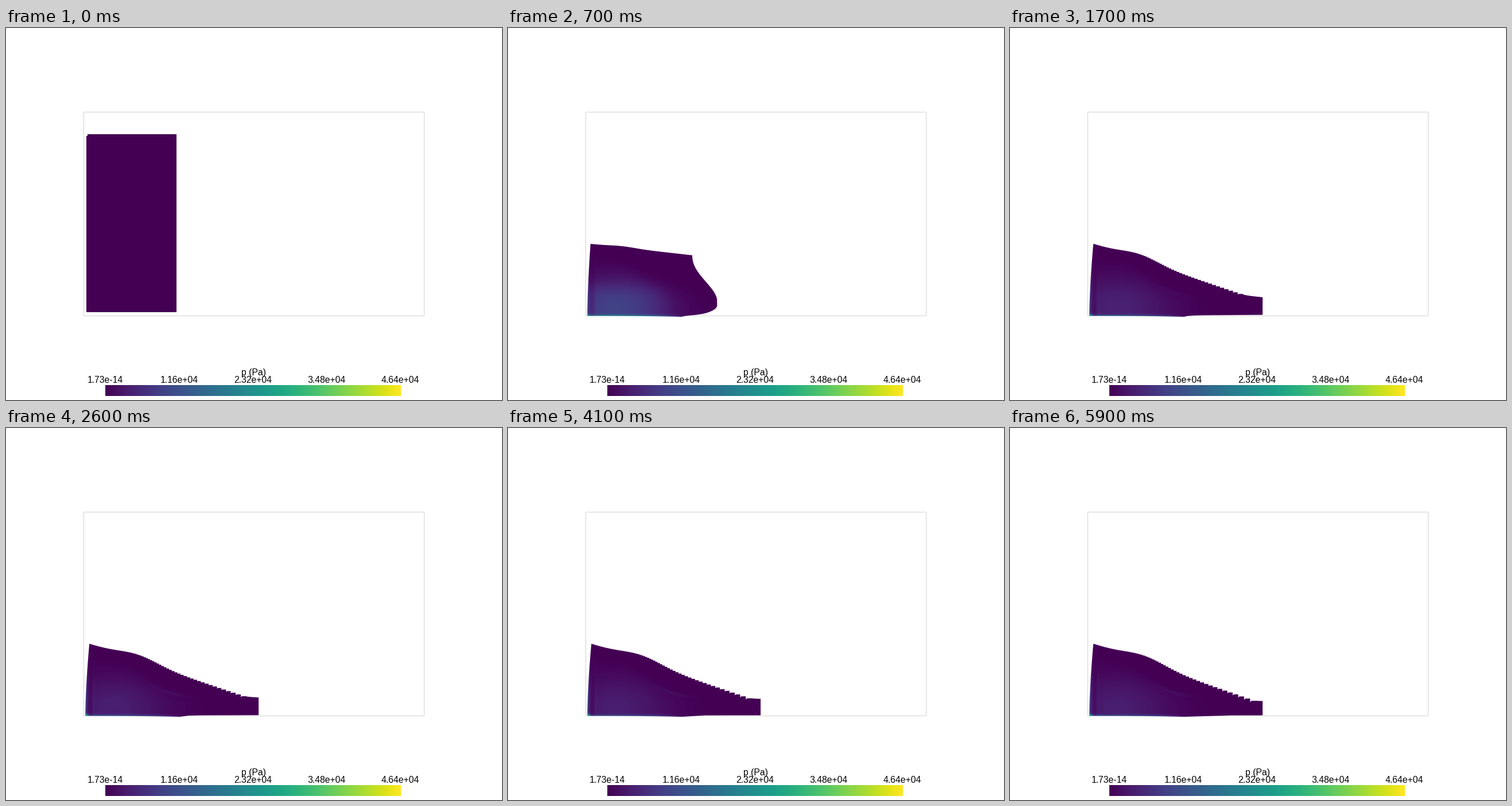
These frames come from a looping animation (864x648 px, 6000 ms). A matplotlib script:

```python
import numpy as np
import matplotlib.pyplot as plt
from matplotlib.animation import FuncAnimation
from matplotlib.patches import Rectangle
from matplotlib.path import Path

W, H, DPI = 864, 648, 100
FRAMES, STEP = 60, 100
PT = 72 / DPI
COLS = 66       # material columns along the free surface
GRAVITY = 950   # px / s^2
FLOOR = 501.6

plt.rcParams["font.family"] = "Liberation Sans"


def ramp(t, start, end):
    return np.clip((t - start) / (end - start), 0, 1)


def rise(z):
    return 1 / (1 + np.exp(-np.clip(z, -40, 40)))


def creep(t, start, speed, lag, rate):
    """Slow drift, approached with a lag that dies away after 0.9 s."""
    return start + speed * t - lag * np.exp(-rate * (t - 0.9))


def left_side(top, foot):
    v = np.linspace(1, 0, 40)
    return np.c_[foot[0] + (top[0] - foot[0]) * (1 - v) ** 1.6,
                 top[1] + (foot[1] - top[1]) * v]


def surface(top, tip):
    """Free surface in flat blocks, one per column, wider towards the tip."""
    s = np.linspace(0, 1, COLS + 1)
    span = tip[0] - top[0]
    even = min(165, span)
    power = 4.2 + 0.07 * max(0, tip[0] - 419)
    x = top[0] + even * s + (span - even) * s**power
    w = np.diff(x)
    q = (x[:-1] + 0.75 * w - top[0]) / (span - 0.25 * w[-1])
    sag = q - 0.11 * np.exp(-((q - 0.32) / 0.18) ** 2)
    y = top[1] + (tip[1] - top[1]) * sag
    notch = np.maximum(0, w - 6) * 0.5
    block = [np.c_[x[:-1], y + notch], np.c_[x[:-1] + 0.2 * w, y], np.c_[x[1:], y]]
    return np.stack(block, axis=1).reshape(-1, 2)


def front(tip, nose):
    """S-shaped face from the tip down to the nose."""
    v = np.linspace(0, 1, 60)
    u = v ** np.clip((nose[1] - tip[1]) / 68, 1, 3)
    return np.c_[tip[0] + (nose[0] - tip[0]) * u * u * (3 - 2 * u),
                 tip[1] + (nose[1] - tip[1]) * v]


def underside(nose, toe, floor, settle):
    """Rounded nose corner, then a thin gap above the floor back to the toe."""
    reach = nose[0] - toe
    radius = min(reach, 3 * max(0, 498 - nose[1]))
    angle = np.linspace(0, np.pi / 2, 30)
    x = np.r_[nose[0] - radius * (1 - np.cos(angle)),
              np.linspace(nose[0] - radius, toe, 40)]
    gap = 1.8 * (x - toe) / max(reach, 1) + 2.5 * (1 - np.exp(-(x - toe) / 8))
    y = floor + settle * (1.5 - gap)
    y[:30] = nose[1] + (y[:30] - nose[1]) * np.sin(angle)
    return np.c_[x, y]


def outline(t):
    fall = GRAVITY / 2 * t**2
    floor = FLOOR - max(0, 7.1 - fall)
    settle = ramp(t, 0, 0.4)
    top = 139.5 + 5.7 * ramp(t, 0.4, 0.8), min(191 + fall, 376)
    foot = 139.5 - 1.4 * settle, floor
    tip = (max(296.5 + 6 * t, creep(t, 413, 2.8, 63, 2)),
           min(191 + fall, creep(t, 461, 2.4, 33, 3.54)))
    nose_x = max(296.5 + 94 * t**2, creep(t, 419, 2.1, 36.4, 2.18))
    nose_y = 491 - 16 * np.exp(-max(0, t - 0.4)) - (FLOOR - floor)
    toe = 296.5 + 6.5 * ramp(t, 0, 0.7)
    u = np.linspace(1, 0, 40)
    base = np.c_[foot[0] + (toe - foot[0]) * u, floor + 1.5 * settle * u**2.5]
    return np.vstack([left_side(top, foot), surface(top, tip),
                      front(tip, (nose_x, nose_y - 4)),
                      underside((nose_x, nose_y + 4), toe, floor, settle), base])


X0, X1, Y0, Y1 = 130, 440, 185, 510
X, Y = np.meshgrid(np.arange(X0, X1) + 0.5, np.arange(Y0, Y1) + 0.5)

SHEAR = 392 + 76 * rise((X - 232) / 26)
BED_Y = FLOOR + 1.5 * ramp(X, 138, 303) ** 2.5
BAND = rise((Y - 450) / 8) * rise((272 - X) / 14)
CORE = (np.exp(-((X - 188) / 90) ** 2 - ((Y - 484) / 50) ** 2)
        * rise((Y - SHEAR) / 7) * (0.4 + 0.6 * rise((X - 151) / 1.5)))
BED = np.exp(-np.clip(BED_Y - Y, 0, None) / 1.6) * rise((285 - X) / 14)
CORNER = np.exp(-((X - 140) / 3) ** 2 - ((Y - 501) / 3) ** 2)
WISP = np.exp(-((Y - SHEAR - 2) / 2.5) ** 2 - ((X - 285) / 28) ** 2)
STRIPE = np.exp(-((X - 153) / 2) ** 2) * rise((Y - 440) / 18)


def pressure(t, shape):
    side = shape[:40]
    edge = np.interp(Y, side[::-1, 1], side[::-1, 0])
    wall = np.exp(-np.clip(X - edge, 0, None) / 2.2) * rise((Y - 446) / 17)
    fresh = np.exp(-max(0, t - 0.9) / 0.6)
    impact = ramp(t, 0.12, 0.35) * (1 - ramp(t, 0.5, 0.9))
    return np.clip(
        0.13 * impact * BAND
        + (0.08 + 0.05 * fresh) * ramp(t, 0.4, 0.7) * CORE
        + (0.28 + 0.1 * fresh) * ramp(t, 0.1, 0.3) * BED
        + (0.3 - 0.15 * fresh) * ramp(t, 0.1, 0.4) * wall
        + 0.3 * ramp(t, 0.1, 2) * CORNER
        + 0.025 * ramp(t, 0.9, 2.6) * WISP
        + 0.02 * ramp(t, 0.4, 0.9) * STRIPE, 0, 1)


fig = plt.figure(figsize=(W / DPI, H / DPI), dpi=DPI, facecolor="white")
ax = fig.add_axes([0, 0, 1, 1])
ax.axis("off")


def shade(values, extent):
    return ax.imshow(values, cmap="viridis", vmin=0, vmax=1, aspect="auto",
                     interpolation="nearest", extent=extent, zorder=2)


def write(x, y, text):
    ax.text(x, y, text, size=15.7 * PT, ha="center", va="baseline")


ax.add_patch(Rectangle((135.5, 146.5), 593, 355, fill=False, ec="#d3d3d3",
                       lw=PT, snap=False, zorder=1))
shade(np.linspace(0, 1, 256)[None], (173, 688, 641, 622))
fluid = shade(np.zeros_like(X), (X0, X1, Y1, Y0))
ax.set_xlim(0, W)
ax.set_ylim(H, 0)

for i, label in enumerate(["1.73e-14", "1.16e+04", "2.32e+04", "3.48e+04", "4.64e+04"]):
    write(173.3 + 128.4 * i, 618, label)
write(431, 605, "p (Pa)")


def draw(frame):
    t = frame * STEP / 1000
    shape = outline(t)
    path = Path(np.vstack([shape, shape[:1]]))
    path.should_simplify = False
    fluid.set_data(pressure(t, shape))
    fluid.set_clip_path(path, ax.transData)
    return [fluid]


anim = FuncAnimation(fig, draw, frames=FRAMES, interval=STEP, repeat=True,
                     repeat_delay=0, blit=False)
plt.show()
```
